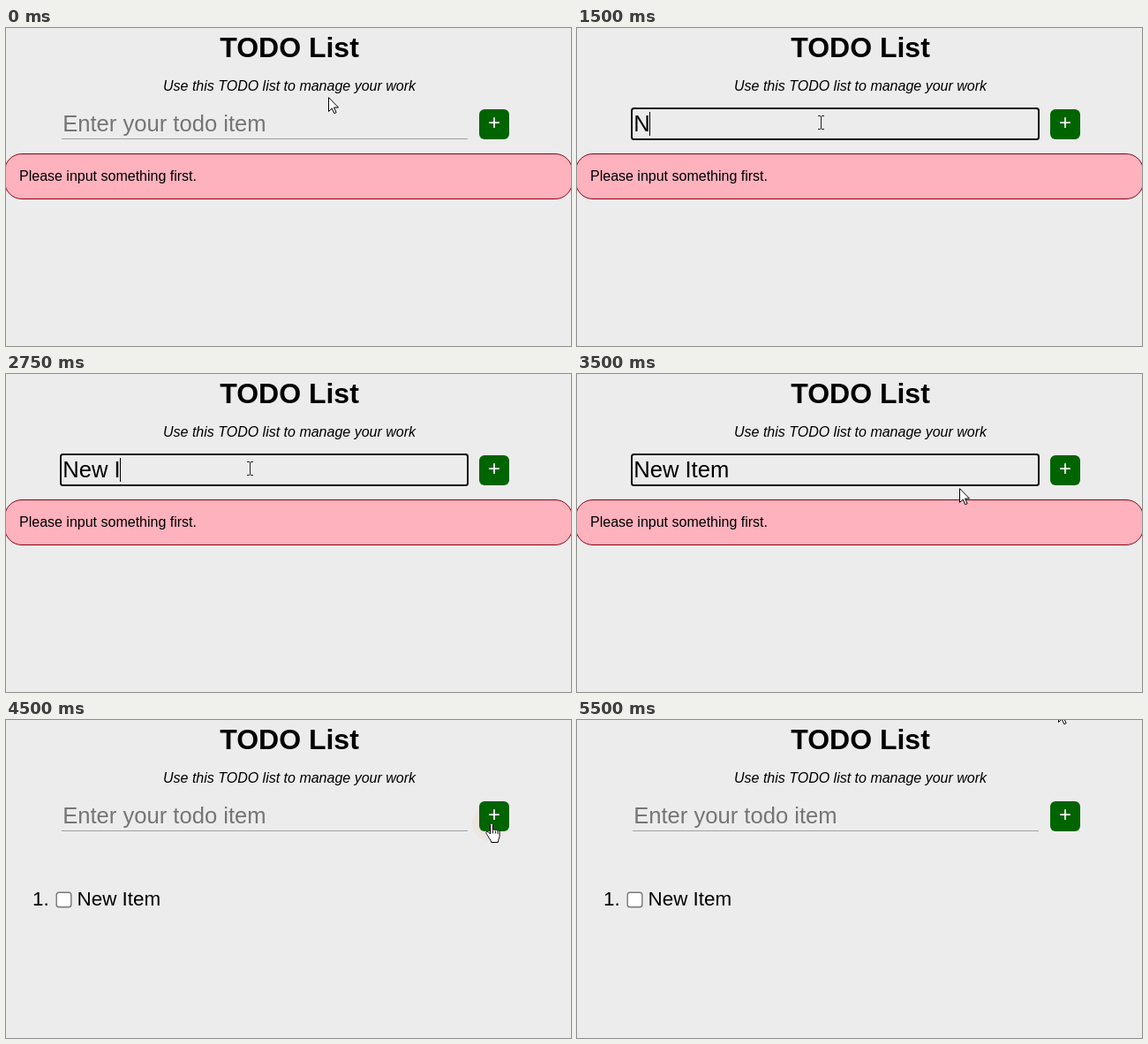
Animation of 640 by 360 pixels, one loop 5750 ms. Source, as an HTML page:

```html
<!DOCTYPE html>
<html lang="en">
<head>
<meta charset="utf-8">
<title>TODO List</title>
<style>
html, body { margin: 0; width: 100%; height: 100%; overflow: hidden; background: #ececec; }
svg { display: block; width: 640px; height: 360px; font-family: "Liberation Sans", Arial, sans-serif; }
.mid { text-anchor: middle; }
.big { font-size: 25.6px; }

/* One loop is 23 steps of 250 ms; every change is a hard cut. */
.a { animation: 5750ms step-end infinite; }
.line { animation-name: line; }
.hint { animation-name: hint; }
.focus { animation-name: focus; }
.typed { animation-name: typed; }
.caret { animation-name: caret; }
.before { animation-name: before; }
.after { animation-name: after; }
.arrow { animation-name: arrow; }
.beam { animation-name: beam; }
.hand { animation-name: hand; }
.tap1 { animation-name: tap1; }
.glow1 { animation-name: glow1; }
.tap2 { animation-name: tap2; }
.glow2 { animation-name: glow2; }

@keyframes line { 0%, 78.26% { opacity: 1 } 17.39% { opacity: 0 } }
@keyframes focus { 0%, 78.26% { opacity: 0 } 17.39% { opacity: 1 } }
@keyframes hint { 0%, 78.26% { opacity: 1 } 26.08% { opacity: 0 } }
@keyframes before { 0% { opacity: 1 } 78.26%, 100% { opacity: 0 } }
@keyframes after { 0% { opacity: 0 } 78.26%, 100% { opacity: 1 } }
@keyframes typed {
  0% { width: 0 }
  26.08% { width: 18.5px }
  30.43% { width: 32.7px }
  34.78% { width: 58.3px }
  47.82% { width: 65.4px }
  52.17% { width: 86.8px }
  56.52% { width: 110px }
  78.26%, 100% { width: 0 }
}
@keyframes caret {
  0% { opacity: 0; transform: none }
  17.39% { opacity: 1; transform: none }
  26.08% { opacity: 1; transform: translateX(18px) }
  30.43% { opacity: 1; transform: translateX(33px) }
  34.78% { opacity: 1; transform: translateX(58px) }
  43.47% { opacity: 0; transform: translateX(58px) }
  47.82% { opacity: 1; transform: translateX(65px) }
  52.17% { opacity: 1; transform: translateX(87px) }
  56.52% { opacity: 1; transform: translateX(108px) }
  60.86% { opacity: 0; transform: translateX(108px) }
  69.56% { opacity: 1; transform: translateX(108px) }
  78.26%, 100% { opacity: 0; transform: none }
}
@keyframes arrow {
  0% { transform: translate(365px, 78px) }
  4.34% { transform: translate(322px, 92px) }
  8.69% { transform: translate(-99px, 0) }
  60.86% { transform: translate(433px, 129px) }
  65.21% { transform: translate(500px, 128px) }
  69.56% { transform: translate(-99px, 0) }
  86.95% { transform: translate(553px, -12px) }
  91.3%, 100% { transform: translate(545px, -14px) }
}
@keyframes beam { 0%, 60.86% { opacity: 0 } 8.69% { opacity: 1 } }
@keyframes hand { 0%, 86.95% { opacity: 0 } 69.56% { opacity: 1 } }
@keyframes tap1 { 0%, 17.39% { opacity: 0 } 13.04% { opacity: 1 } }
@keyframes glow1 { 0%, 21.73% { opacity: 0 } 17.39% { opacity: .4 } }
@keyframes tap2 { 0%, 78.26% { opacity: 0 } 73.91% { opacity: 1 } }
@keyframes glow2 { 0%, 82.6% { opacity: 0 } 78.26% { opacity: .4 } }
</style>
</head>
<body>
<svg viewBox="0 0 640 360">
  <defs>
    <clipPath id="shown"><rect class="a typed" x="64" y="90" width="0" height="36"/></clipPath>
  </defs>
  <rect width="640" height="360" fill="#ececec"/>
  <circle class="a glow1" cx="274" cy="107" r="20" fill="#eadfcd"/>
  <circle class="a glow2" cx="548" cy="117" r="20" fill="#ecdcd0"/>

  <text class="mid" x="321" y="33" font-size="32" font-weight="bold">TODO List</text>
  <text class="mid" x="321" y="71" font-size="16" font-style="italic">Use this TODO list to manage your work</text>

  <rect class="a line" x="63" y="125" width="460" height="1" fill="#a0a0a0"/>
  <rect class="a focus" x="62" y="91" width="461" height="35" rx="2.5" fill="none" stroke="#101010" stroke-width="2"/>
  <text class="a hint big" x="64.2" y="117" fill="#757575">Enter your todo item</text>
  <text class="big" x="64.2" y="117" clip-path="url(#shown)">New Item</text>
  <rect class="a caret" x="64" y="95" width="1" height="27"/>

  <rect x="536" y="92" width="34" height="34" rx="6" fill="#006400"/>
  <text class="mid" x="553" y="115" font-size="24" fill="#fff">+</text>

  <g class="a before">
    <rect x="-1.5" y="142.5" width="643" height="51" rx="19.5" fill="#fdb2be" stroke="#8b0010"/>
    <text x="15" y="173" font-size="16">Please input something first.</text>
  </g>

  <g class="a after" font-size="22.4">
    <text x="30" y="210">1.</text>
    <rect x="57.2" y="195.2" width="16.6" height="16.6" rx="2.8" fill="#fff" stroke="#767676" stroke-width="1.4"/>
    <text x="80.6" y="210">New Item</text>
  </g>

  <g class="a tap1">
    <circle cx="274" cy="106" r="7" fill="#91793f"/>
    <ellipse cx="273.5" cy="106" rx="2" ry="3" fill="#d9cfae"/>
  </g>
  <path class="a beam" d="M273 99.5h3m1 0h3M276.5 100v14M273 114.5h3m1 0h3" fill="none" stroke="#222"/>
  <g class="a hand">
    <path d="M548.5 118.5c0-2 3-2 3 0v6.2c.3-1.3 2.6-1.2 2.8.3.4-1.1 2.4-.9 2.6.6.5-.9 2.2-.6 2.2 1v4.6c0 2.6-1.6 3.9-1.8 7.3h-7.6c-.3-2.8-2.6-4.6-3.8-7.1-.7-1.5-2.1-2.7-2.1-4 .3-1.6 2.5-1.3 4.7 1.6z" fill="#fff" stroke="#000"/>
    <path d="M551.6 125v3.5m2.8-3v3m2.6-2.5v3" fill="none" stroke="#000" stroke-width=".9"/>
  </g>
  <g class="a tap2">
    <circle cx="548" cy="116.5" r="6" fill="#8c725c"/>
    <circle cx="548.5" cy="116.5" r="2" fill="#5c3b32"/>
  </g>
  <path class="a arrow" d="M.5.7V16.5L4.2 13l2.6 5.7 2.3-1L6.5 12h5z" fill="#fff" stroke="#000"/>
</svg>
</body>
</html>
```
